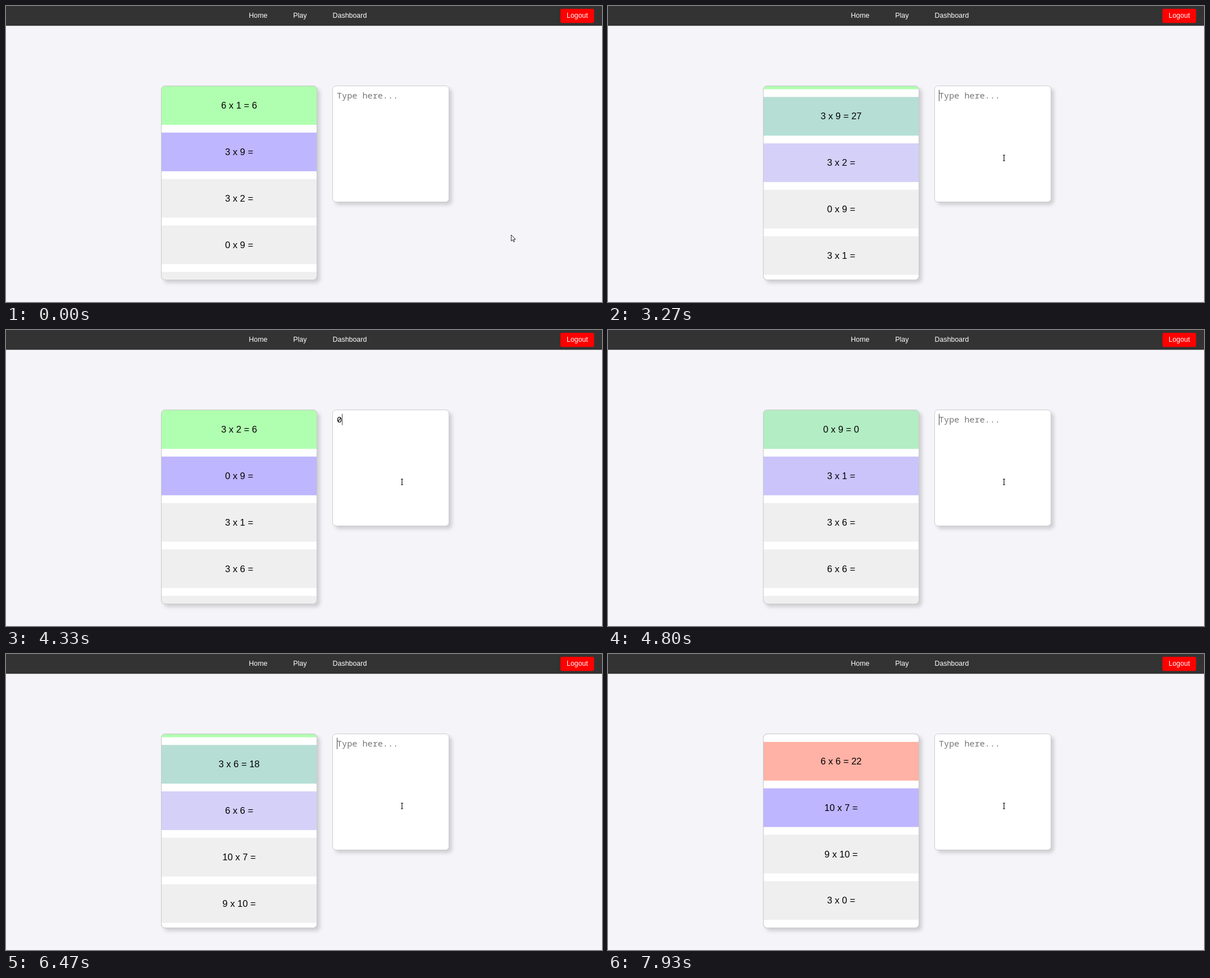
An HTML page that plays this animation: 1061x528 px, repeating every 8 s.

```html
<!DOCTYPE html>
<html lang="en">
<head>
<meta charset="utf-8">
<title>Multiplication practice</title>
<style>
  html, body { margin: 0; width: 100%; height: 100%; overflow: hidden; background: #f4f4f9; }
  svg { display: block; width: 1061px; height: 528px; font-family: "Liberation Sans", Arial, sans-serif; }
  .nav { font-size: 12.42px; fill: #fff; }
  .card { fill: #fff; stroke: #c8c8ca; stroke-width: .9; }
  .shadow { filter: drop-shadow(5.5px 5.5px 3.4px rgba(0, 0, 0, .15)); }
  #list text { font-size: 16.56px; text-anchor: middle; }
  #field { font-family: "Noto Sans Mono", "DejaVu Sans Mono", monospace; font-size: 15.17px; }
</style>
</head>
<body>
<svg viewBox="0 0 1061 528" xmlns="http://www.w3.org/2000/svg">
  <defs>
    <clipPath id="inside"><rect x="276.9" y="142.9" width="276.2" height="345.5" rx="6.4"/></clipPath>
  </defs>

  <rect width="1061" height="35.3" fill="#333"/>
  <rect x="987" y="5" width="60" height="25.3" rx="2.8" fill="#f00"/>
  <g class="nav">
    <text x="432.3" y="21.4">Home</text>
    <text x="511.3" y="21.4">Play</text>
    <text x="581.6" y="21.4">Dashboard</text>
    <text x="998" y="21.4">Logout</text>
  </g>

  <rect class="card shadow" x="276.5" y="142.5" width="277" height="346.2" rx="6.9"/>
  <g clip-path="url(#inside)"><g id="list"></g></g>
  <rect class="card" style="fill:none" x="276.5" y="142.5" width="277" height="346.2" rx="6.9"/>

  <rect class="card shadow" x="581.5" y="142.5" width="207" height="207" rx="6.2"/>
  <text id="field" x="589" y="165.3"></text>
  <rect id="caret" y="149.5" width="1" height="20.2" fill="#444"/>

  <path id="arrow" d="M.4 .4V11.2L2.9 8.9L4.6 12.7L6.3 12L4.7 8.2H8Z"
        fill="#fff" stroke="#111" stroke-width=".9" stroke-linejoin="round"/>
  <path id="beam" d="M-2 -5H-.6L0 -4.4L.6 -5H2M0 -4.4V4.4M-2 5H-.6L0 4.4L.6 5H2"
        fill="none" stroke="#111" stroke-width="1.2"/>
</svg>

<script>
const LOOP = 8000, FRAME = 1000 / 15;
const TOP = 143, HEIGHT = 69, PITCH = 82.8, VIEW = 345;
const GREY = [239, 239, 239], PURPLE = [190, 182, 255], GREEN = [176, 255, 176], RED = [255, 178, 165];

const problems = [[6, 1], [3, 9], [3, 2], [0, 9], [3, 1], [3, 6], [6, 6], [10, 7], [9, 10], [3, 0]];
const keys = [[2600, "2"], [2870, "7"], [3600, "6"], [4330, "0"], [5070, "3"],
              [5800, "1"], [6000, "8"], [6930, "2"], [7200, "2"]];
const enters = [3113, 3820, 4574, 5330, 6313, 7459];
const FOCUS = 530, BLINK = 530, FADE = 500, SCROLL_DELAY = 36;
const mouse = [[0, 0], [70, .15], [130, .55], [200, .9], [270, 1]];

const $ = id => document.getElementById(id);
const clamp = x => Math.min(1, Math.max(0, x));

function bezier(x1, y1, x2, y2) {
  const at = (a, b, u) => 3 * a * u * (1 - u) ** 2 + 3 * b * u * u * (1 - u) + u ** 3;
  return x => {
    if (x <= 0 || x >= 1) return clamp(x);
    let lo = 0, hi = 1;
    for (let i = 0; i < 24; i++) {
      const mid = (lo + hi) / 2;
      if (at(x1, x2, mid) < x) lo = mid; else hi = mid;
    }
    return at(y1, y2, lo);
  };
}
const ease = bezier(.25, .1, .25, 1);
const easeInOut = bezier(.42, 0, .58, 1);

const typed = (from, to) => keys.filter(([at]) => at > from && at <= to).map(k => k[1]).join("");
const mix = (a, b, p) => `rgb(${a.map((v, i) => Math.round(v + (b[i] - v) * p))})`;
const latest = (times, t) => Math.max(0, ...times.filter(at => at <= t));

function add(tag, attrs, parent) {
  const el = document.createElementNS("http://www.w3.org/2000/svg", tag);
  for (const name in attrs) el.setAttribute(name, attrs[name]);
  return parent.appendChild(el);
}

const rows = problems.map(([a, b], i) => {
  const y = TOP + i * PITCH;
  const box = add("rect", { x: 276, y, width: 278, height: HEIGHT }, $("list"));
  const label = add("text", { x: 415, y: y + 40.2 }, $("list"));
  // The first problem is already answered and the second is active from the start.
  const start = i < 2 ? -FADE : enters[i - 2] ?? Infinity;
  const done = i < 1 ? -FADE : enters[i - 1] ?? Infinity;
  const answer = i < 1 ? "6" : typed(enters[i - 2] ?? 0, done);
  return { box, label, start, done, answer, question: `${a} x ${b} =`, right: +answer === a * b };
});

const maxScroll = problems.length * PITCH - VIEW;
function scrollAt(t) {
  return enters.reduce((sum, at, i) => {
    const step = Math.min(PITCH, maxScroll - i * PITCH);
    const duration = Math.sqrt(step / .69) * 1000 / 60;
    return sum + step * easeInOut((t - at - SCROLL_DELAY) / duration);
  }, 0);
}

function drawRows(t) {
  for (const r of rows) {
    const solved = t >= r.done;
    r.label.textContent = solved ? `${r.question} ${r.answer}` : r.question;
    r.box.setAttribute("fill", solved
      ? mix(PURPLE, r.right ? GREEN : RED, ease((t - r.done) / FADE))
      : mix(GREY, PURPLE, ease((t - r.start) / FADE)));
  }
  $("list").setAttribute("transform", `translate(0 ${-scrollAt(t)})`);
}

function drawField(t) {
  const text = typed(latest(enters, t), t);
  $("field").textContent = text || "Type here...";
  $("field").setAttribute("fill", text ? "#000" : "#757575");

  const resets = [FOCUS, ...keys.map(k => k[0]), ...enters];
  const last = latest(resets, t);
  const since = enters.includes(last) ? last - 65 : last;
  const on = t >= FOCUS && Math.floor((t - since) / BLINK) % 2 === 0;
  $("caret").setAttribute("x", 589 + Math.round(text.length * 9.1));
  $("caret").style.display = on ? "" : "none";
}

function drawMouse(t) {
  const p = mouse.filter(m => m[0] <= t).pop()[1];
  const x = 899 - 194 * p, y = 408 - 137 * p;
  const over = x < 788 && y < 349;
  for (const [id, show] of [["arrow", !over], ["beam", over]]) {
    $(id).style.display = show ? "" : "none";
    $(id).setAttribute("transform", `translate(${x} ${y})`);
  }
}

const begin = performance.now();
function draw() {
  const now = Math.max(0, performance.now() - begin) % LOOP;
  const t = Math.floor((now + 4) / FRAME) % (LOOP / FRAME) * FRAME + 4;
  drawRows(t);
  drawField(t);
  drawMouse(t);
  requestAnimationFrame(draw);
}
draw();
</script>
</body>
</html>
```
